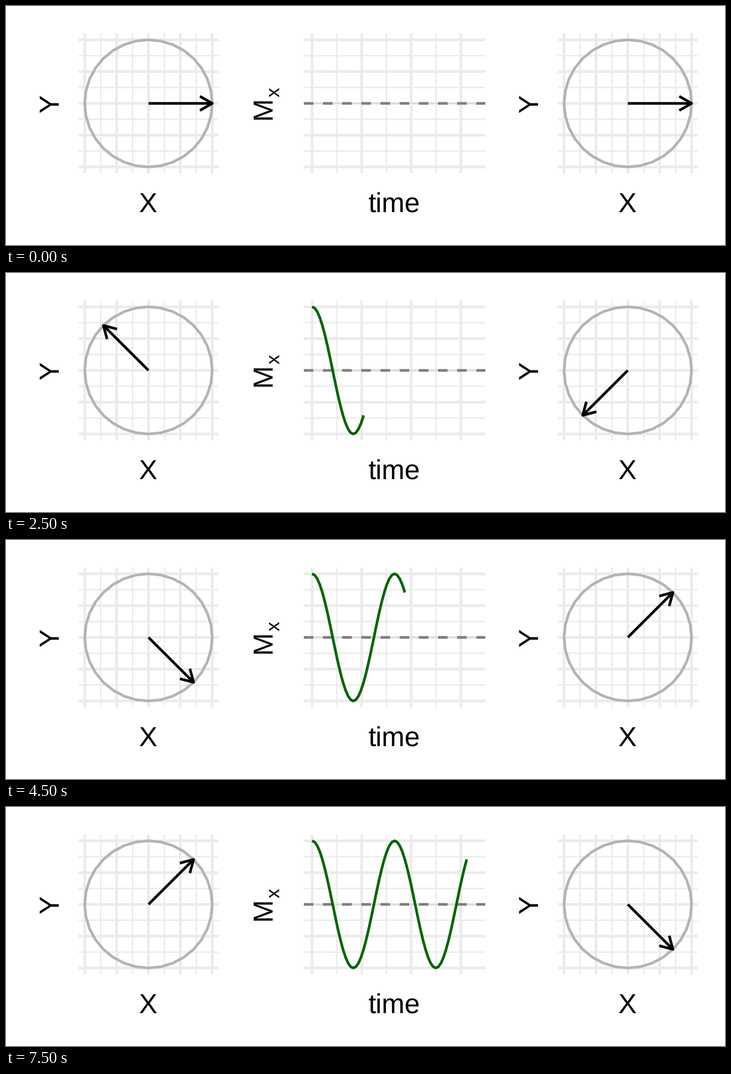
A matplotlib script for the animation above (8 s loop, 1200 by 400 pixels).

```python
import matplotlib
import matplotlib.pyplot as plt
import numpy as np
from matplotlib.animation import FuncAnimation

W, H, DPI = 1200, 400, 100
FRAMES, INTERVAL = 16, 500
PX = 72 / DPI                      # points per pixel
THICK, THIN = 4.45, 2.22
MID, R, PAD = 163, 106.4, 10.6     # vertical centre, unit length, panel margin
TOP, BOTTOM = MID - R - PAD, MID + R + PAD
FONT, SUB = 45.83, 32.08
HEAD = 23.6                        # length of the arrow barbs
T0, STEP, SAMPLES = 510.8, 17.21, 4

matplotlib.rcParams["font.family"] = "Liberation Sans"
matplotlib.rcParams["text.hinting"] = "none"
matplotlib.rcParams["path.simplify"] = False

fig = plt.figure(figsize=(W / DPI, H / DPI), dpi=DPI, facecolor="white")
ax = fig.add_axes([0, 0, 1, 1])
ax.set_xlim(0, W)
ax.set_ylim(H, 0)
ax.axis("off")


def stroke(x, y, color, width=THICK, **kw):
    line, = ax.plot(x, y, color=color, lw=width * PX, solid_capstyle="butt",
                    dash_capstyle="butt", solid_joinstyle="round", **kw)
    line.set_snap(False)
    return line


def grid(left, right, xs_major, xs_minor):
    ys = MID + R * np.linspace(-1, 1, 9)
    for xs, rows, width in ((xs_minor, ys[1::2], THIN), (xs_major, ys[::2], THICK)):
        for y in rows:
            stroke([left, right], [y, y], "#ebebeb", width)
        for x in xs:
            stroke([x, x], [TOP, BOTTOM], "#ebebeb", width)


def label(x, y, text, size=FONT, rotation=0, ha="center"):
    ax.text(x, y, text, fontsize=size * PX, color="black", rotation=rotation,
            ha=ha, va="baseline", rotation_mode="anchor")


def dial(cx):
    xs = cx + R * np.linspace(-1, 1, 9)
    grid(cx - R - PAD, cx + R + PAD, xs[::2], xs[1::2])
    a = np.linspace(0, 2 * np.pi, 33)
    stroke(cx + R * np.cos(a), MID - R * np.sin(a), "#b3b3b3")
    label(cx - 0.6, 344.6, "X")
    label(88, MID, "Y", rotation=90) if cx < W / 2 else label(888, MID, "Y", rotation=90)
    return cx, stroke([], [], "black"), stroke([], [], "black")


def point_arrow(parts, angle):
    cx, shaft, head = parts
    tip_x, tip_y = cx + R * np.cos(angle), MID - R * np.sin(angle)
    shaft.set_data([cx, tip_x], [MID, tip_y])
    barbs = angle + np.pi + np.radians([-30, 30])
    bx, by = tip_x + HEAD * np.cos(barbs), tip_y - HEAD * np.sin(barbs)
    head.set_data([bx[0], tip_x, bx[1]], [by[0], tip_y, by[1]])


left_dial, right_dial = dial(237.8), dial(1037.8)

# Signal panel
LEFT, RIGHT = 497, 800
majors = T0 + 82.75 * np.arange(4)
grid(LEFT, RIGHT, majors, majors[:3] + 41.4)
stroke([LEFT, RIGHT], [MID, MID], "#c8c8c8", 1)
dash = 16 / THICK
stroke([LEFT, RIGHT], [MID, MID], "#7f7f7f", linestyle=(0, (dash, dash)))
signal = stroke([], [], "#006400")
label(648, 344.6, "time")
label(442, 190.2, "M", rotation=90, ha="left")
label(457, 152, "x", SUB, 90, "left")


def update(i):
    turn = i * np.pi / 4
    point_arrow(left_dial, -turn)
    point_arrow(right_dial, turn)
    t = np.arange(i * SAMPLES + 1) / SAMPLES if i else np.array([])
    signal.set_data(T0 + STEP * t, MID - R * np.cos(t * np.pi / 4))
    return ()


anim = FuncAnimation(fig, update, frames=FRAMES, interval=INTERVAL,
                     repeat=True, repeat_delay=0, blit=False)
plt.show()
```
